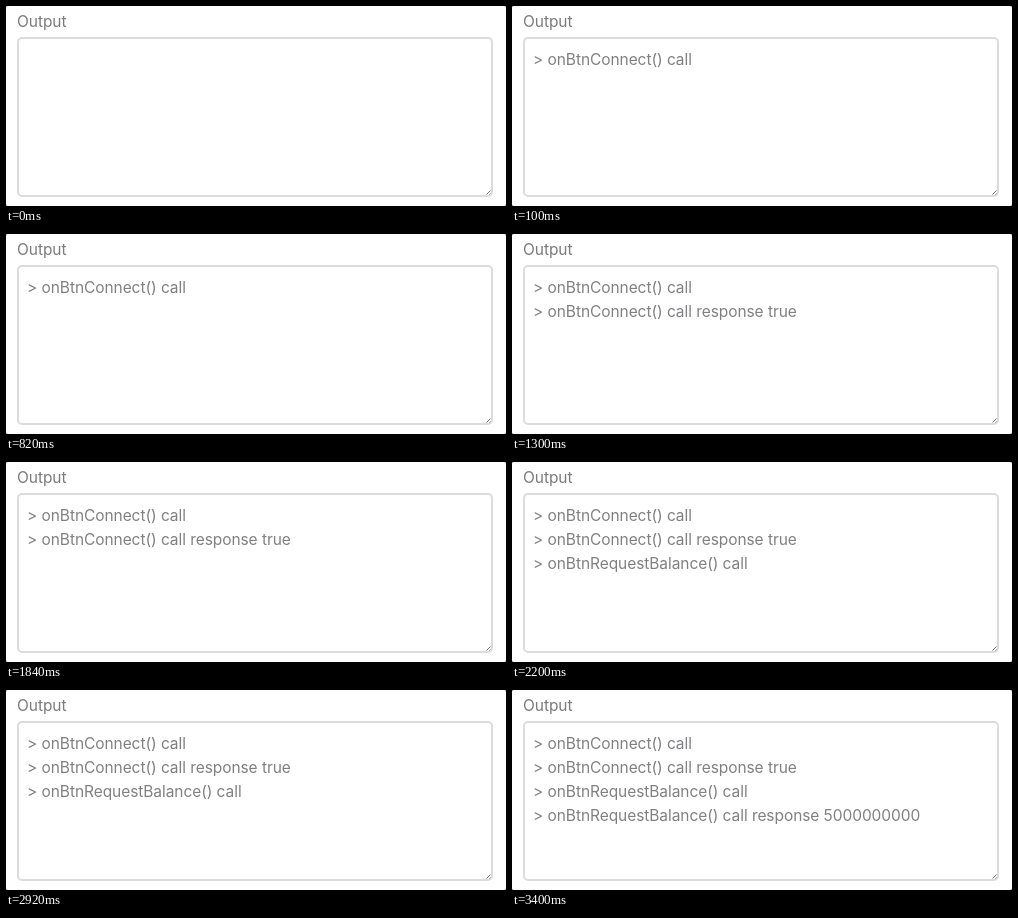
An HTML page that plays this animation: 500 px wide and 200 px high, repeating every 4200 ms.

```html
<!DOCTYPE html>
<html lang="en">
<head>
<meta charset="utf-8">
<title>Output log</title>
<style>
  html, body { margin: 0; width: 100%; height: 100%; overflow: hidden; background: #fff; }
  svg { display: block; width: 500px; height: 200px; }
  text {
    font: 15.5px Inter, Roboto, sans-serif;
    font-feature-settings: "calt" 0;
    letter-spacing: -0.065px;
    white-space: pre;
    fill: #808083;
  }
  .label { fill: #7a7a7a; }
</style>
</head>
<body>
<svg viewBox="0 0 500 200">
  <rect width="500" height="200" fill="#777"/>
  <rect width="500" height="200" rx="2" fill="#fff"/>
  <text class="label" x="11" y="21">Output</text>
  <rect x="12" y="32" width="474" height="158" rx="4" fill="#fff" stroke="#dcdcdc" stroke-width="2"/>
  <path d="M480.5 188.5l4-4M483.5 188.5l1-1" stroke="#777" fill="none"/>
  <g id="log"></g>
</svg>
<script>
  const LOOP = 4200;
  const LINES = [
    [100, "> onBtnConnect() call"],
    [1300, "> onBtnConnect() call response true"],
    [2200, "> onBtnRequestBalance() call"],
    [3400, "> onBtnRequestBalance() call response 5000000000"]
  ];

  const log = document.getElementById("log");
  const rows = LINES.map(([start, line], i) => {
    const el = document.createElementNS("http://www.w3.org/2000/svg", "text");
    el.setAttribute("x", 21);
    el.setAttribute("y", 59 + 24 * i);
    el.textContent = line;
    log.append(el);
    return { el, start };
  });

  const origin = performance.now();

  function draw() {
    const t = (performance.now() - origin) % LOOP;
    for (const { el, start } of rows) {
      el.setAttribute("visibility", t >= start ? "visible" : "hidden");
    }
    requestAnimationFrame(draw);
  }
  draw();
</script>
</body>
</html>
```
